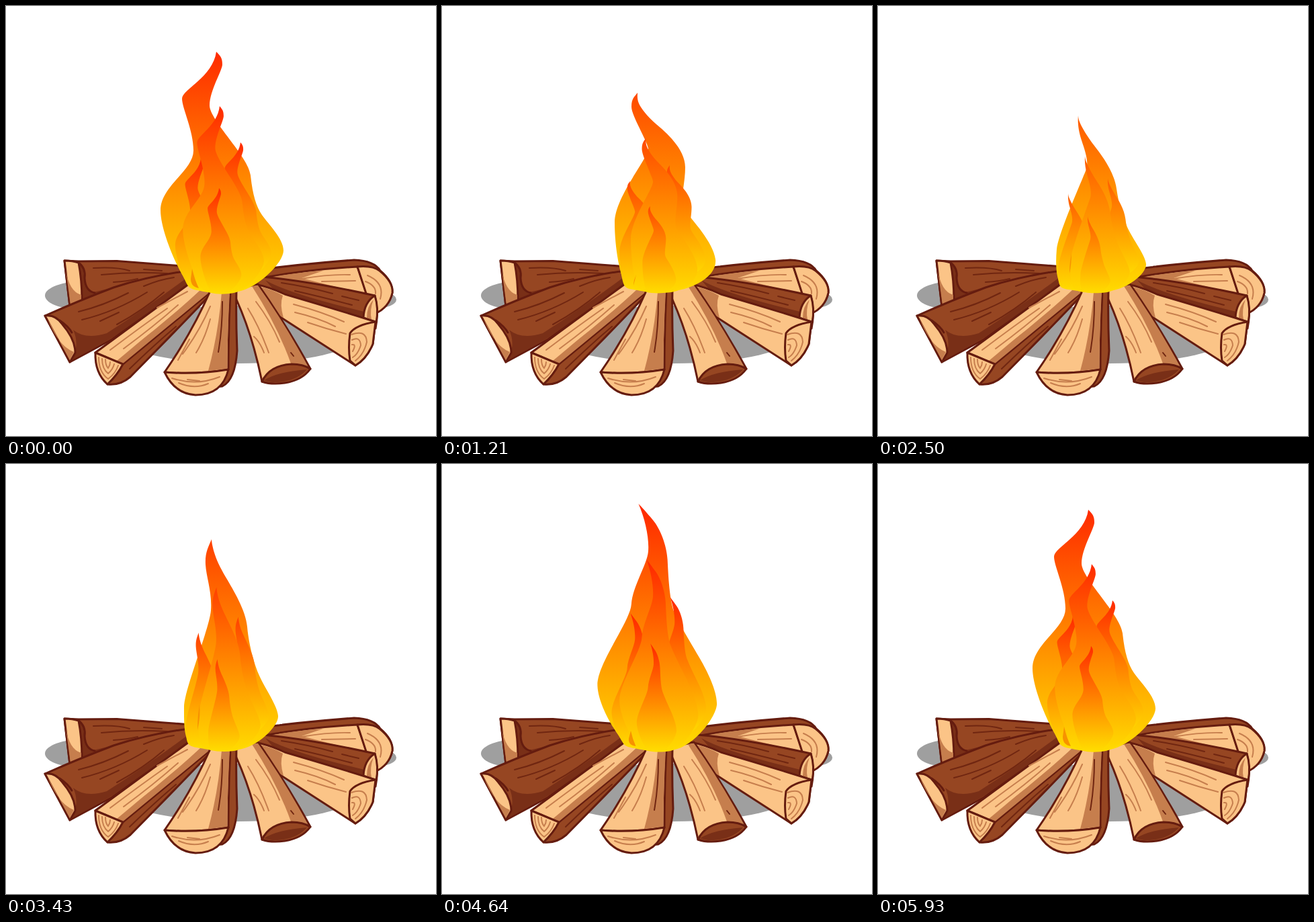
These frames come from a looping animation (640 px wide and 640 px high, 6000 ms). An HTML page:

```html
<!DOCTYPE html>
<html lang="en">
<head>
<meta charset="utf-8">
<title>Campfire</title>
<style>
html, body { margin: 0; width: 100%; height: 100%; overflow: hidden; background: #fff; }
svg { display: block; width: 100vw; height: 100vh; }

.ink { stroke: #651c0f; stroke-width: 3; stroke-linejoin: round; stroke-linecap: round; }
.line { fill: none; }
.pale { fill: #fbc487; }
.tan { fill: #c67e4d; }
.bark { fill: #964622; }
.deep { fill: #792f17; }
.grain { fill: none; stroke: #c67e4d; stroke-width: 2; stroke-linecap: round; }
.groove { fill: none; stroke: #702611; stroke-width: 2; stroke-linecap: round; }

.flame { fill: url(#heat); animation: sway 6s linear infinite; }
.ember { fill: #f79200; animation: ember 6s linear infinite; }

/* Tip, down the right edge, across the base, up the left edge. */
@keyframes sway {
  0%, 98.83%, 100% { d: path("M313 68 C320 75 322 78 322 87 S303 126 303 148 S361 224 364 252 S372 298 381 311 S413 346 413 364 S375 420 345 425 S286 426 275 418 S230 340 230 304 S279 245 279 215 S262 152 262 138 S308 106 313 68 Z"); }
  20.17% { d: path("M291 129 C291 133 290 138 293 145 S306 165 319 176 S362 212 362 240 S352 292 362 305 S404 352 407 377 S374 421 345 424 S283 426 274 415 S257 360 257 322 S309 224 307 212 S282 163 282 150 S287 135 291 129 Z"); }
  29.17% { d: path("M294 148 C294 150 294 154 297 161 S308 180 318 193 S357 232 359 256 S357 296 366 314 S403 360 405 380 S374 421 345 424 S283 426 274 416 S252 378 251 345 S306 243 308 228 S296 187 293 172 S291 156 294 148 Z"); }
  41.67% { d: path("M298 163 C298 167 299 171 302 177 S312 195 322 208 S351 245 355 272 S363 306 369 324 S398 370 399 384 S372 421 345 424 S283 425 274 417 S264 385 266 362 S306 254 310 243 S308 215 303 200 S297 172 298 163 Z"); }
  50% { d: path("M302 143 C302 146 303 150 306 157 S315 175 325 190 S354 232 357 258 S365 300 373 320 S401 365 402 380 S373 421 345 424 S283 425 274 416 S256 388 254 358 S304 250 308 230 S303 191 300 175 S299 152 302 143 Z"); }
  57.17% { d: path("M306 112 C306 115 307 122 310 132 S318 153 328 170 S357 218 359 242 S368 295 377 315 S404 360 405 375 S374 422 345 425 S283 425 274 416 S265 388 265 362 S303 245 305 218 S298 168 297 150 S301 124 306 112 Z"); }
  69% { d: path("M290 74 C294 78 303 87 314 99 S341 130 343 152 S340 208 345 228 S367 273 379 289 S413 332 414 350 S375 421 345 426 S283 426 274 417 S246 375 247 345 S280 214 281 203 S310 157 311 143 S302 96 290 74 Z"); }
  79.17% { d: path("M293 56 C297 60 304 68 314 80 S333 118 334 140 S338 204 347 222 S374 270 385 290 S408 338 408 358 S374 421 345 425 S281 425 272 416 S230 360 228 327 S280 240 282 210 S304 148 306 128 S303 80 293 56 Z"); }
  86.83% { d: path("M291 72 C295 74 305 79 315 87 S326 112 325 140 S338 208 349 221 S383 272 391 296 S403 352 402 372 S374 420 345 425 S281 425 271 414 S250 385 250 353 S285 290 284 240 S297 150 303 125 S303 92 291 72 Z"); animation-timing-function: ease-in; }
}
@keyframes ember {
  0%, 98.83%, 100% { d: path("M277 391 Q281 408 287 420 Q275 418 275 406 Z"); }
  20.17% { d: path("M289 400 Q287 408 285 416 Q285 414 286 408 Z"); }
  41.67% { d: path("M288 368 Q288 384 285 398 Q285 388 286 380 Z"); }
  57.17% { d: path("M288 358 Q290 374 285 396 Q285 384 286 372 Z"); }
  69% { d: path("M281 396 Q283 408 288 420 Q277 418 278 408 Z"); }
  86.83% { d: path("M281 398 Q284 410 289 420 Q277 419 278 409 Z"); animation-timing-function: ease-in; }
}
</style>
</head>
<body>
<svg viewBox="0 0 640 640">
  <defs>
    <linearGradient id="heat" gradientUnits="userSpaceOnUse" x1="0" y1="68" x2="0" y2="428">
      <stop offset="0" stop-color="#ff2a00"/>
      <stop offset="1" stop-color="#ffdd00"/>
    </linearGradient>
  </defs>

  <g fill="#9f9f9f">
    <ellipse cx="120" cy="431" rx="62" ry="22"/>
    <ellipse cx="345" cy="489" rx="180" ry="43"/>
    <ellipse cx="400" cy="450" rx="52" ry="26"/>
    <ellipse cx="550" cy="437" rx="31" ry="13"/>
  </g>

  <!-- back left -->
  <g>
    <path class="bark ink" d="M87 379 L108 380 L165 379.500 L275 388 L270 400 L160 425 L95 447 Z"/>
    <path class="deep" d="M106 381 Q117 388 116 406 Q119 422 130 426 L240 400 L265 396 L150 432 L114 438 Z"/>
    <path class="pale ink" d="M87 379 Q99 379 108 382 Q113 408 113 438 L95 447 Z"/>
    <path class="tan" d="M89 393 Q94 425 112 430 L112 439 L96 445 Z"/>
    <path class="line ink" d="M108 382 Q119 390 117 405 Q118 424 132 427"/>
    <path class="groove" d="M130 390 Q165 388 184 394 M142 400 Q190 395 240 398 M160 411 Q180 410 196 406 M205 392 L232 394"/>
  </g>

  <!-- back right -->
  <g>
    <path class="bark ink" d="M372 393 Q440 384 518 378 Q548 379 557 394 Q576 410 575 427 Q570 449 548 458 L372 414 Z"/>
    <path class="pale ink" d="M385 404 Q450 392 523 388 L538 432 L520 432 Z"/>
    <path class="tan" d="M392 404 Q430 397 472 394 L440 405 L534 429 L500 430 Z"/>
    <path class="pale ink" d="M523 388 Q546 386 556 394 Q577 411 575 427 Q570 449 549 458 L537 431 Z"/>
    <path class="grain" d="M440 406 Q480 399 512 400 M470 410 L520 409 M538 401 Q564 412 557 436 M535 410 Q551 416 550 428"/>
  </g>

  <!-- middle right -->
  <g>
    <path class="bark ink" d="M368 402 Q440 407 549 431 Q555 455 550 480 L535 480 L390 428 L368 424 Z"/>
    <path class="deep" d="M386 408 Q420 428 533 455 L530 464 L400 424 Z"/>
    <path class="pale ink" d="M549 431 Q533 441 532 464 L551 471 Q555 450 549 431 Z"/>
    <path class="tan" d="M547 437 Q537 447 537 464 L544 467 Q541 452 547 437 Z"/>
    <path class="groove" d="M410 412 Q450 418 486 428 M430 424 Q470 433 515 445 M500 432 L525 438"/>
  </g>

  <!-- front left -->
  <g>
    <path class="bark ink" d="M58 461 Q110 438 160 419 Q215 401 280 393 L277 411 Q215 454 158 496 L95 530 Z"/>
    <path class="deep" d="M278 398 Q210 449 150 487 Q118 497 100 482 Q110 504 98 527 L158 494 L276 411 Z"/>
    <path class="pale ink" d="M58 461 Q74 459 84 474 Q103 496 103 516 L95 530 Z"/>
    <path class="tan" d="M62 466 Q78 506 101 515 L95 527 Z"/>
    <path class="line ink" d="M80 468 Q93 477 98 486"/>
    <path class="groove" d="M108 455 Q145 446 182 427 M113 467 Q163 455 210 426 M140 469 L168 456 M205 417 Q229 407 250 404 M165 474 Q205 452 235 426"/>
  </g>

  <!-- front right -->
  <g>
    <path class="pale ink" d="M370 414 Q392 418 415 429 Q480 448 550 470 L546 503 Q537 525 520 535 L396 455 Z"/>
    <path class="tan" d="M374 417 Q398 422 412 431 Q407 444 413 464 L396 454 Z"/>
    <path class="pale ink" d="M550 470 Q520 475 512 487 Q509 509 512 528 L520 535 Q537 525 546 503 Z"/>
    <path class="grain" d="M428 444 Q470 455 503 470 M430 456 Q465 464 490 477 M449 471 Q478 481 506 488 M515 497 Q527 491 528 505 Q524 518 516 523 M514 489 Q536 481 537 500 Q533 518 520 528 M515 504 Q522 503 516 514"/>
  </g>

  <!-- lower left -->
  <g>
    <path class="bark ink" d="M133 516 L272 414 L308 424 L300 434 Q250 486 185 552 Q170 565 151 563 Z"/>
    <path class="pale ink" d="M133 516 L272 414 L306 424 L174 533 Z"/>
    <path class="tan" d="M304 425 L174 532 L162 527 Q230 478 290 422 Z"/>
    <path class="pale" d="M290 421 Q230 474 165 528 L150 521 L272 417 Z"/>
    <path class="pale ink" d="M133 516 L174 533 Q166 549 151 563 Q132 546 133 516 Z"/>
    <path class="grain" d="M155 512 Q200 478 240 450 M175 510 Q220 477 256 445 M225 449 L270 425 M191 513 L225 488 M138 523 Q138 545 152 555 Q163 547 167 535 M143 525 Q143 540 152 547 Q159 541 161 533 M148 526 Q148 535 152 539 Q155 535 155 530"/>
    <path class="groove" d="M184 540 Q220 505 253 477"/>
  </g>

  <!-- lower right -->
  <g>
    <path class="pale ink" d="M338 422 L375 414 Q417 474 453 540 L381 559 Q367 490 343 437 Z"/>
    <path class="tan" d="M366 417 L375 416 Q417 475 451 540 L424 532 Q404 476 366 417 Z"/>
    <path class="bark ink" d="M381 559 Q392 535 425 533 Q442 533 453 540 Q441 557 415 561 Q395 564 381 559 Z"/>
    <path class="deep" d="M384 557 Q405 544 448 541 Q436 555 413 559 Q396 562 384 557 Z"/>
    <path class="grain" d="M360 450 Q377 477 391 516 M369 492 Q378 500 384 516 M372 440 Q394 469 407 500"/>
    <path class="groove" d="M424 516 L428 521"/>
  </g>

  <!-- front centre -->
  <g>
    <path class="bark ink" d="M325 424 L343 423 Q342 465 344 513 Q341 557 322 566 L300 568 Z"/>
    <path class="pale ink" d="M304 424 L334 424 Q331 480 331 541 Q283 549 236 545 Q277 486 304 424 Z"/>
    <path class="tan" d="M321 426 L333 426 Q330 480 329 540 L301 543 Q316 488 321 426 Z"/>
    <path class="pale ink" d="M236 545 Q283 549 331 541 Q322 579 282 579 Q251 577 236 545 Z"/>
    <path class="grain" d="M304 447 Q288 484 263 518 M304 466 Q296 495 283 516 M273 496 L256 527 M247 554 Q283 566 318 552 M257 561 Q280 571 301 562 M270 556 L288 558"/>
    <path class="groove" d="M322 440 Q322 481 316 515"/>
  </g>

  <path class="flame"/>
  <path class="flame" transform="matrix(.46 0 0 .558 205 165.100)"/>
  <path class="flame" transform="matrix(.46 0 0 .547 146 189.800)"/>
  <path class="flame" transform="matrix(.66 0 0 .779 111.400 96)"/>
  <path class="ember"/>
  <path class="flame" transform="matrix(.333 0 0 .436 212.800 241.400)"/>
</svg>
</body>
</html>
```
